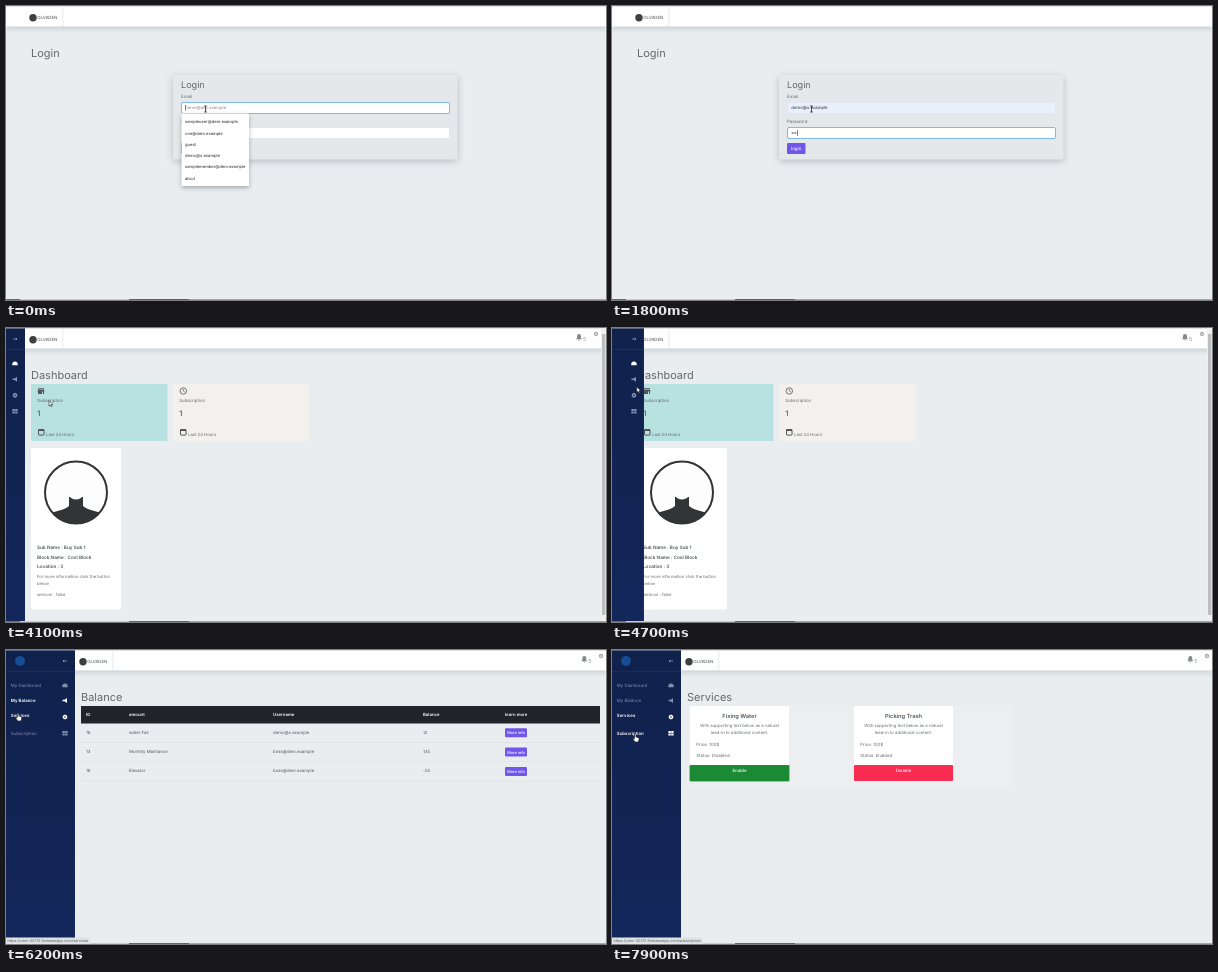
These frames come from a looping animation (600 px wide and 294 px high, 8 s). An HTML page with a canvas:

```html
<!DOCTYPE html>
<html lang="en">
<head>
<meta charset="utf-8">
<title>Building portal</title>
<style>
html, body { margin: 0; width: 100%; height: 100%; overflow: hidden; background: #e9edf0; }
canvas { display: block; width: 600px; height: 294px; }
</style>
</head>
<body>
<canvas id="stage" width="600" height="294"></canvas>
<script>
const ctx = document.getElementById('stage').getContext('2d');
const GREY = '#666a6d', INK = '#50565a', PURPLE = '#7157e8';
const HOST = 'https://umc-20170.firebaseapp.com/';

function rect(x, y, w, h, fill, radius = 0, stroke) {
  ctx.beginPath();
  ctx.roundRect(x, y, w, h, radius);
  if (fill) { ctx.fillStyle = fill; ctx.fill(); }
  if (stroke) { ctx.strokeStyle = stroke; ctx.lineWidth = 1; ctx.stroke(); }
}
function shadowRect(x, y, w, h, fill, radius, blur, alpha) {
  ctx.save();
  ctx.shadowColor = `rgba(40,50,60,${alpha})`;
  ctx.shadowBlur = blur;
  ctx.shadowOffsetY = 2;
  rect(x, y, w, h, fill, radius);
  ctx.restore();
}
// Text is placed by the vertical centre of its capitals.
function text(s, x, y, size = 4.35, color = GREY, weight = 400, align = 'left') {
  ctx.font = `${weight} ${size}px Inter, sans-serif`;
  ctx.fillStyle = color;
  ctx.textAlign = align;
  ctx.fillText(s, x, y + size * 0.36);
}
function circle(x, y, r, fill, stroke, width = 1) {
  ctx.beginPath();
  ctx.arc(x, y, r, 0, 7);
  if (fill) { ctx.fillStyle = fill; ctx.fill(); }
  if (stroke) { ctx.strokeStyle = stroke; ctx.lineWidth = width; ctx.stroke(); }
}
function path(d, x, y, fill, stroke, width = 1) {
  const p = new Path2D(d);
  ctx.save();
  ctx.translate(x, y);
  if (fill) { ctx.fillStyle = fill; ctx.fill(p); }
  if (stroke) { ctx.strokeStyle = stroke; ctx.lineWidth = width; ctx.stroke(p); }
  ctx.restore();
}
// Value of [time, ...values] keys, eased between neighbours.
function track(keys, t) {
  let i = 0;
  while (i < keys.length - 2 && t >= keys[i + 1][0]) i++;
  const [a, b] = [keys[i], keys[i + 1]];
  const u = Math.min(1, Math.max(0, (t - a[0]) / (b[0] - a[0])));
  const k = u * u * (3 - 2 * u);
  return a.slice(1).map((v, j) => v + (b[j + 1] - v) * k);
}

function frameBase(shift, signedIn, scrollbar) {
  rect(0, 0, 600, 294, '#e9edf0');
  shadowRect(0, -2, 600, 22.5, '#fefefe', 0, 5, 0.16);
  rect(0, 0, 600, 1, '#e2e3e4');
  rect(56.5 + shift, 1, 0.8, 20, '#e3e5e7');
  circle(27 + shift, 11.8, 3.7, '#3d3f42');
  text('OLVADEN', 31.3 + shift, 11.7, 4.3, '#4c4e51');
  if (signedIn) {
    const x = scrollbar ? 573 : 578.3;
    path('M-3 2 L-2 .8 V-1 A2 2.2 0 0 1 2 -1 V.8 L3 2Z M-1 2.6 H1 L0 3.6Z', x, 9.2, '#85898d');
    text('5', x + 4, 10.5, 5.6, '#96999c');
    circle(scrollbar ? 590 : 595, 6, 1.5, null, '#a4a7aa', 1.3);
  }
  if (scrollbar) {
    rect(595, 0, 5, 293, '#f0f0f0');
    rect(596, 6, 3.4, 281, '#bcbebf');
  }
}
function taskbarLine() {
  rect(0, 293, 600, 1, '#a5a9ab');
  rect(0, 293, 14, 1, '#676c70');
  rect(14, 293, 109, 1, '#c9cdcf');
  rect(123, 293, 60, 1, '#5f6467');
}

function loginPage(t) {
  frameBase(0);
  text('Login', 25, 46.8, 11, GREY);
  if (t >= 2900) return;
  const filled = t >= 500, onPassword = t >= 800;
  shadowRect(167, 69, 284.5, 84.5, '#e4e8eb', 1.5, 7, 0.25);
  text('Login', 175, 79, 9.1);
  text('Email', 175, 90.2, 4.4);
  text('Password', 175, 115.3, 4.4);
  const field = (y, focused, fill) =>
    rect(175.5, y, 268, 11, fill, 1.5, focused ? '#7fb8ee' : '#e3e7ea');
  field(96.5, !onPassword, filled ? '#e8f0fe' : '#fff');
  field(121.5, onPassword, '#fff');

  const choice = Math.floor(t / 100) - 1;
  const preview = choice >= 3;
  text(preview ? 'demo@x.example' : 'name@any.example', 179.3, 101.6, 4.3, preview ? '#2c3034' : '#858a8e');
  if (!onPassword) {
    if (t < 100) rect(179, 99, 0.6, 5.5, '#333');
  } else {
    const dots = t < 1600 ? 0 : t < 1800 ? 1 : Math.min(7, 3 + (t - 1800) / 100);
    for (let i = 0; i < dots; i++) circle(180.3 + i * 1.7, 127, 0.7, '#4b5054');
    if (t < 2400) rect(180 + dots * 1.7, 124, 0.6, 6, '#333');
  }
  rect(175, 137, 18.5, 11, t >= 2300 ? '#5a43c7' : PURPLE, 1);
  text('login', 184.2, 142.5, 4.4, '#fff', 500, 'center');

  if (!filled) {
    shadowRect(175.5, 107.5, 67.5, 72.5, '#fff', 0.5, 4, 0.35);
    ['sampleuser@dem.example', 'one@dem.example', 'guest', 'demo@x.example',
      'samplemember@dem.example', 'abcd'].forEach((entry, i) => {
      const y = 115.8 + i * 11.25;
      if (i === choice) rect(176, y - 5.5, 66.5, 11, '#e6e8ea');
      text(entry, 179, y, 4.15, '#25282a');
    });
  }
}

function statCard(x, fill, clock) {
  rect(x, 56, 136.5, 57, fill);
  if (clock) {
    circle(x + 10.3, 63, 3.2, null, INK, 0.8);
    path('M0 -2 V0 L1.5 1', x + 10.3, 63, null, INK, 0.7);
  } else {
    path('M-3 -2.7 H3 V-2 H-3Z M-3 -1.5 H3 L3.5 .5 H-3.5Z M-3 .5 H1 V3 H-3Z M2 .5 H3 V3 H2Z', x + 10, 63, INK);
  }
  text('Subscription', x + 6.3, 72, 4.35);
  text('1', x + 6.3, 85, 7.5, INK, 500);
  rect(x + 7.5, 101.5, 5.5, 5.6, null, 0.5, INK);
  rect(x + 7.5, 101, 5.5, 2, INK);
  text('Last 24 Hours', x + 15, 106, 4.25);
}
function dashboard() {
  frameBase(0, true, true);
  text('Dashboard', 25, 46.8, 11);
  statCard(25, '#b8e1e1', false);
  statCard(167, '#f2f1ed', true);
  rect(25, 120, 90, 161.5, '#fff', 1);
  ctx.save();
  circle(70, 164.5, 31, '#fdfdfd', '#333436', 2);
  ctx.clip();
  path('M-31 31 V23 C-27 17 -14 18 -7 12 V3 H7 V12 C14 18 27 17 31 23 V31Z', 70, 166, '#333436');
  ctx.beginPath();
  ctx.ellipse(70, 158, 10.5, 13.5, 0, 0, 7);
  ctx.fill();
  ctx.restore();
  ['Sub Name : Buy Sub 1', 'Block Name : Cool Block', 'Location : 3'].forEach((s, i) =>
    text(s, 31, 219.2 + i * 9.7, 4.65, INK, 600));
  text('For more information click the button', 31, 248.3, 4.2);
  text('below', 31, 255, 4.2);
  text('welcom : false', 31, 266.5, 4.2);
}

function balancePage() {
  frameBase(50, true);
  text('Balance', 75, 46.8, 11);
  const columns = [80, 123, 267, 417, 499];
  const row = (cells, y, color, weight) =>
    cells.forEach((s, i) => text(s, columns[i], y, 4.3, color, weight));
  rect(75, 56, 519, 17.5, '#212428');
  row(['ID', 'amount', 'Username', 'Balance', 'learn more'], 64.7, '#fff', 600);
  [['16', 'water Fall', 'demo@x.example', '12'],
    ['13', 'Monthly Maintance', 'boss@dem.example', '135'],
    ['18', 'Elavator', 'boss@dem.example', '-25']].forEach((cells, i) => {
    const y = 82 + i * 19.4;
    row(cells, y, '#53585c', 400);
    rect(499, y - 3.8, 22, 9, PURPLE, 1);
    text('More info', 510, y + 0.7, 3.9, '#fff', 500, 'center');
    rect(75, y + 10, 519, 0.7, '#dce0e3');
  });
}

function serviceCard(x, title, status, action, fill) {
  const mid = x + 49.5;
  rect(x, 56, 99, 60, '#fff', 1);
  text(title, mid, 65.5, 5.7, INK, 600, 'center');
  text('With supporting text below as a natural', mid, 75.5, 4.25, GREY, 400, 'center');
  text('lead-in to additional content.', mid, 82.2, 4.25, GREY, 400, 'center');
  text('Price: 100$', x + 6.3, 94);
  text('Status: ' + status, x + 6.3, 105.3);
  rect(x, 115, 99, 16, fill, 1);
  text(action, mid, 120.7, 4.35, '#fff', 500, 'center');
}
function servicesPage(t) {
  frameBase(50, true);
  text('Services', 75, 46.8, 11);
  rect(75, 56, 325, 81, '#eceeef');
  const pressed = t >= 7100, hovered = t >= 6800;
  if (pressed) rect(77, 114, 101, 18, '#8ccb9b', 2);
  serviceCard(78, 'Fixing Water', 'Disabled', 'Enable', pressed ? '#1b8a35' : hovered ? '#259b85' : '#28a745');
  serviceCard(242, 'Picking Trash', 'Enabled', 'Disable', '#f72c50');
}

const ICONS = [
  'M-2.6 2 A2.8 2.8 0 1 1 2.6 2Z',
  'M-2.5 -.8 H-.5 L2 -2.5 V2.5 L-.5 .8 H-2.5Z',
  'M0 -2.6 L2.2 -1.3 V1.3 L0 2.6 L-2.2 1.3 V-1.3Z M0 -1 L-.9 0 L0 1 L.9 0Z',
  'M-2.6 -2.2 H-.2 V-.2 H-2.6Z M.2 -2.2 H2.6 V-.2 H.2Z M-2.6 .2 H-.2 V2.2 H-2.6Z M.2 .2 H2.6 V2.2 H.2Z'
];
function sidebar(width, active, hovered) {
  const fill = ctx.createLinearGradient(0, 0, 0, 294);
  fill.addColorStop(0, '#10214c');
  fill.addColorStop(1, '#14275b');
  rect(0, 0, width, 294, fill);
  rect(0, 0, width, 1, '#53617f');
  rect(0, 21, width, 0.6, '#243864');
  const open = width > 45, iconX = width - 10;
  path(open ? 'M2 0 H-2 M-.8 -1 L-2 0 L-.8 1' : 'M-2 0 H2 M.8 -1 L2 0 L.8 1', iconX, 11, null, '#9fb0cf', 0.7);
  if (open) circle(14, 11, 5, '#164d96');
  ['My Dashboard', 'My Balance', 'Services', 'Subscription'].forEach((label, i) => {
    const y = open ? [35, 50.2, 65.5, 83][i] : 35 + i * 16;
    const lit = i === active || i === hovered;
    const color = lit ? '#fff' : '#8290b0';
    path(ICONS[i], iconX, open && i === 2 ? 67 : y + 0.3, color);
    if (open) text(label, 4.8, y, 4.4, color, lit ? 600 : 400);
  });
}

function statusBar(page) {
  const url = HOST + page;
  ctx.font = '3.8px Inter, sans-serif';
  rect(0, 287.5, ctx.measureText(url).width + 3, 6.5, '#dfe2e5', [0, 1, 0, 0]);
  text(url, 1.5, 290.8, 3.8, '#5d6165');
}

const POINTER = [
  [0, 199.5, 103], [2500, 199.5, 103], [3200, 166, 147.5], [3500, 166, 147.5],
  [4100, 43, 72.5], [4300, 43, 72.5], [5000, 13, 50], [5600, 11, 54.5], [6000, 11, 54.5],
  [6300, 12, 66], [6400, 12, 66], [6900, 138, 122.5], [7200, 138, 122.5],
  [7850, 23, 84], [8000, 23, 84]
];
function pointer(t) {
  const [x, y] = track(POINTER, t);
  const hand = t >= 4900 && t < 6500 || t >= 6800 && t < 7300 || t >= 7800;
  if (t < 2500) {
    path('M-1.3 -3 H1.3 M0 -3 V3 M-1.3 3 H1.3', x, y, null, '#24272a', 0.8);
  } else if (hand) {
    path('M-.5 .5 Q.3 -.5 1 .5 V3 L4 3.7 V6 L3 8 H0 L-2 5 L-1.5 4 L-.5 4.8Z', x, y, '#fff', '#222', 0.7);
  } else {
    path('M0 0 V5.5 L1.3 4.4 L2.1 6.2 L3 5.8 L2.2 4 H3.8Z', x, y, '#fff', '#222', 0.6);
  }
}

function draw(now) {
  const t = Math.floor(now % 8000 / 100) * 100;
  ctx.textRendering = 'geometricPrecision';
  if (t < 3700) {
    loginPage(t);
  } else {
    if (t < 5400) dashboard();
    else if (t < 6400) balancePage();
    else servicesPage(t);
    const [width] = track([[4600, 19], [4900, 69]], t);
    const active = t < 5400 ? 0 : t < 6400 ? 1 : 2;
    const hovered = t >= 7900 ? 3 : t >= 6200 ? 2 : t >= 5000 ? 1 : -1;
    sidebar(width, active, hovered);
  }
  taskbarLine();
  if (t >= 7900) statusBar('subscription');
  else if (t >= 6200 && t < 6600) statusBar('services');
  else if (t >= 5000 && t < 6200) statusBar('user/balance');
  pointer(t);
  requestAnimationFrame(draw);
}
requestAnimationFrame(draw);
</script>
</body>
</html>
```
